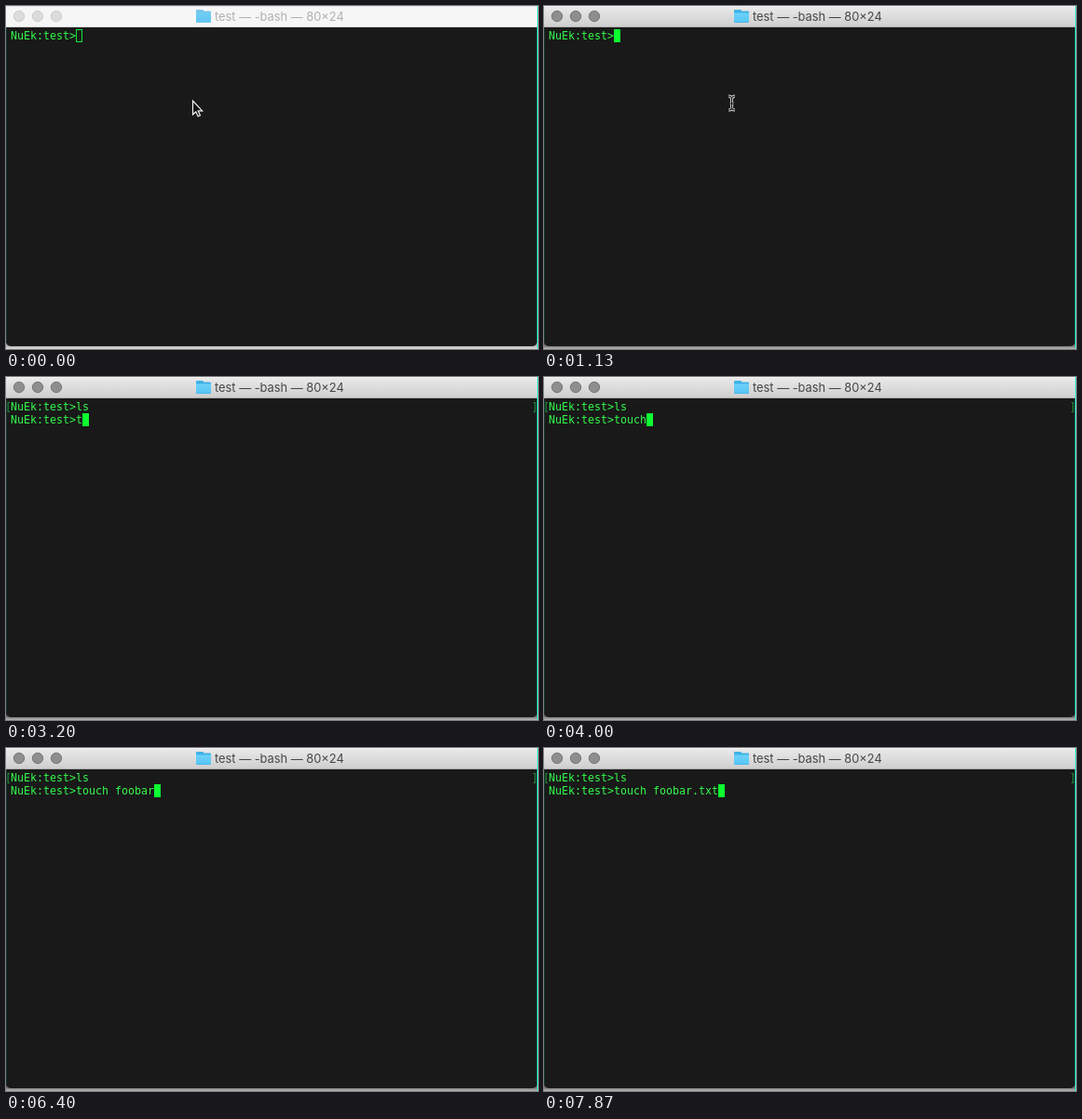
An HTML page with a canvas that plays this animation: 571 by 369 pixels, repeating every 8000 ms.

```html
<!DOCTYPE html>
<html lang="en">
<head>
<meta charset="utf-8">
<title>Terminal</title>
<style>
html, body { margin: 0; width: 100%; height: 100%; overflow: hidden; background: #b4b4b4; }
canvas { display: block; }
</style>
</head>
<body>
<canvas id="stage" width="571" height="369"></canvas>
<script>
const ctx = document.getElementById('stage').getContext('2d');
const W = 571, H = 369, LOOP = 8000;
const CELL = 7, LINE = 14, LEFT = 5, TOP = 25;
const MONO = '11.63px "DejaVu Sans Mono", "Noto Sans Mono", monospace';
const SANS = 'px Inter, Roboto, sans-serif';
const PROMPT = 'NuEk:test>';
const TITLE = 'test — -bash — 80×24';

const FOCUS = 70, HIDE_MOUSE = 1270, ENTER = 1870;
const KEYS_1 = [1270, 1470];
const KEYS_2 = [3130, 3270, 3600, 3800, 3930, 4730, 5400, 5670,
                5870, 6000, 6270, 6400, 6930, 7270, 7600, 7870];
const BLINKS = [[670, 1000], [2670, 3130], [4670, 4730]];

const typed = (text, keys, t) => text.slice(0, keys.filter(k => t >= k).length);

// Title size that gives the label its 139 px run
ctx.font = 13 + SANS;
const titleSize = 13 * 139 / ctx.measureText(TITLE).width;

function rect(color, x, y, w, h) {
  ctx.fillStyle = color;
  ctx.fillRect(x, y, w, h);
}

function text(str, x, y, font, color) {
  ctx.font = font;
  ctx.fillStyle = color;
  ctx.fillText(str, x, y);
}

function fade(y0, y1, a, b) {
  const g = ctx.createLinearGradient(0, y0, 0, y1);
  g.addColorStop(0, a);
  g.addColorStop(1, b);
  return g;
}

function drawFrame(active) {
  rect(active ? fade(365, 369, '#6a6a6a', '#b8b8b8') : fade(365, 369, '#a8a8a8', '#dedede'), 0, 0, W, H);
  ctx.fillStyle = '#191919';
  ctx.beginPath();
  ctx.roundRect(0, 20, 570, 346, [0, 0, 5, 5]);
  ctx.fill();
  rect('#12382c', 0, 23, 1, 338);
  rect('#0f3a30', 569, 23, 1, 338);
  rect('#3af5d2', 570, 0, 1, H);
}

function drawFolder(active) {
  ctx.globalAlpha = active ? 1 : 0.7;
  ctx.fillStyle = '#3fb2e6';
  ctx.beginPath();
  ctx.roundRect(204, 4, 8, 6, 1);
  ctx.roundRect(204, 5.5, 16, 12.5, 1);
  ctx.fill();
  ctx.fillStyle = fade(7, 18, '#6fd2fb', '#55c5f5');
  ctx.fillRect(204, 7.5, 16, 9.8);
  ctx.globalAlpha = 1;
}

function drawTitleBar(active) {
  rect(active ? fade(0, 22, '#eaeaea', '#cfcfcf') : '#f6f6f6', 0, 0, 570, 22);
  rect(active ? '#f4f4f4' : '#e6e6e6', 0, 0, 570, 1);
  rect(active ? '#adadad' : '#d2d2d2', 0, 22, 570, 1);
  ctx.lineWidth = 1;
  for (const x of [14, 34, 54]) {
    ctx.beginPath();
    ctx.arc(x, 11, 5.7, 0, Math.PI * 2);
    ctx.fillStyle = active ? '#8e8e8e' : '#dcdcdc';
    ctx.strokeStyle = active ? '#777' : '#cdcdcd';
    ctx.fill();
    ctx.stroke();
  }
  drawFolder(active);
  text(TITLE, 224, 16, titleSize + SANS, active ? '#464646' : '#b0b0b0');
}

function drawCursor(col, row, t) {
  if (BLINKS.some(([off, on]) => t >= off && t < on)) return;
  const x = LEFT + col * CELL, y = TOP + row * LINE;
  if (t >= FOCUS) return rect('#0cff30', x, y, CELL, LINE);
  ctx.strokeStyle = '#0ce932';
  ctx.lineWidth = 1;
  ctx.strokeRect(x + 0.5, y + 0.5, CELL - 1, LINE - 1);
}

function drawShell(t) {
  const put = (str, x, row, color = '#34fa4c') => text(str, x, TOP + 11 + row * LINE, MONO, color);
  const first = PROMPT + typed('ls', KEYS_1, t);
  if (t < ENTER) {
    drawCursor(first.length, 0, t);
    put(first, LEFT, 0);
    return;
  }
  const second = PROMPT + typed('touch foobar.txt', KEYS_2, t);
  put('[', -1, 0, '#219640');
  put(']', 564, 0, '#219640');
  put(first, LEFT, 0);
  drawCursor(second.length, 1, t);
  put(second, LEFT, 1);
}

function outline(path, width, color) {
  ctx.lineWidth = width;
  ctx.strokeStyle = color;
  ctx.stroke(path);
}

const arrow = new Path2D('M200.5 102V116.8L203.8 113.7L206.1 118.8L208.5 117.7L206.2 112.8H210.7Z');
const beam = new Path2D('M198 97Q201.5 97 201.5 100Q201.5 97 205 97' +
  'M201.5 100V109M198 112Q201.5 112 201.5 109Q201.5 112 205 112M199.7 105H203.3');

function drawMouse(t) {
  if (t >= HIDE_MOUSE) return;
  if (t < FOCUS) {
    ctx.fillStyle = '#111';
    ctx.fill(arrow);
    outline(arrow, 1.2, '#f2f2f2');
  } else {
    outline(beam, 3, '#d8d8d8');
    outline(beam, 1.2, '#151515');
  }
}

function draw(t) {
  const active = t >= FOCUS;
  drawFrame(active);
  drawTitleBar(active);
  drawShell(t);
  drawMouse(t);
}

const start = performance.now();
function tick() {
  draw((performance.now() - start) % LOOP);
  requestAnimationFrame(tick);
}
tick();
</script>
</body>
</html>
```
